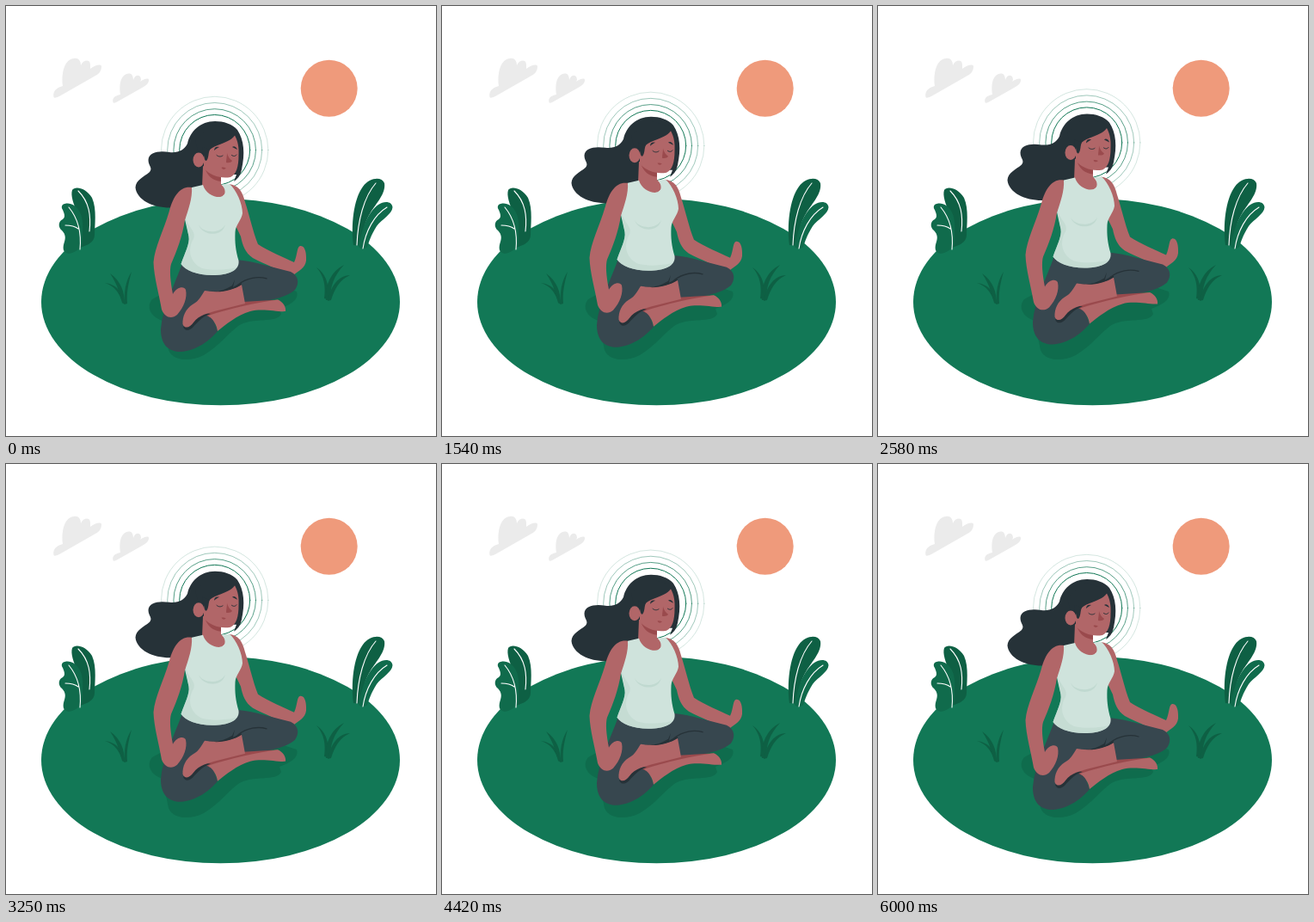
Recreate the animation shown at these times as an HTML page. Size 500 by 500 pixels, loop 6040 ms.

```html
<!DOCTYPE html>
<html lang="en">
<head>
<meta charset="utf-8">
<title>Meditation</title>
<style>
  html, body { margin: 0; width: 100%; height: 100%; overflow: hidden; background: #fff; }
  svg { display: block; width: 100vw; height: 100vh; }
  .line { fill: none; stroke-linecap: round; stroke-linejoin: round; }
  .leaf { fill: #0e6044; }
  .leaf-light { fill: #106b4c; }
  .vein { stroke: #fff; stroke-width: 1.1; }
  .shade { fill: #0f6c4d; }
  .skin { fill: #b16668; }
  .skin-dark { fill: #9a4a4d; }
  .hair { fill: #263238; }
  .pants { fill: #37474f; }
  .fold { stroke: #263238; stroke-width: 1.3; }
  .top { fill: #cfe3dc; }
  .top-dark { fill: #c0d9d0; }
</style>
</head>
<body>
<svg viewBox="0 0 500 500">
  <!-- sky -->
  <circle cx="375.7" cy="95.8" r="33" fill="#ef9a7b"/>
  <g fill="#ebebeb">
    <path d="M55.5 106C54 100 58 95 66 93C64 78 68 62 79 61C85 60 87 65 87 69C90 62 98 62 98 68V73C103 69 110 67 111 70C111 76 108 79 104 81L62 105C58 107 56 107 55.5 106Z"/>
    <path d="M124.5 112C123 107 127 104 133 103C131 90 134 79 143 78.5C147 78 148 83 148 86C150 79 157 79 157 86L156 88C160 85 166 83 166 86C166 90 163 92 160 94L129 111.5C126 113 125 113 124.5 112Z"/>
  </g>

  <ellipse cx="249.5" cy="344.1" rx="208.5" ry="120.2" fill="#127856"/>

  <!-- plants -->
  <path class="leaf" d="M77 214C80 209 93 211 100 223C106 236 103 256 103 267C102 276 94 278 86 281L84 242C78 230 75 220 77 214Z"/>
  <path class="line vein" d="M84 215C97 228 99 244 97 262"/>
  <path class="leaf-light" d="M66 231C72 227 82 231 86 240C91 250 89 262 88 279C84 284 79 287 73 288C65 287 66 280 68 274C70 268 68 264 65 261C60 257 61 250 66 248C70 245 67 240 66 237C64 234 65 232 66 231Z"/>
  <path class="line vein" d="M73 234C83 246 88 262 86 283M69 255C75 255 80 256 84 259"/>
  <path class="leaf" d="M404 278C401 255 404 225 415 210C423 199 437 198 440 206C442 218 430 230 424 240C417 251 414 265 413 279Z"/>
  <path class="line vein" d="M430 206C416 222 409 250 408 278"/>
  <path class="leaf-light" d="M410 280C413 262 420 240 433 231C440 226 449 227 449.5 234C449 242 437 248 431 256C424 267 422 275 420 280C417 283 413 283 410 280Z"/>
  <path class="line vein" d="M443 234C428 243 418 262 415 282"/>
  <g class="leaf">
    <path d="M136 346C136 334 130 324 115 322C128 326 132 335 136 346Z"/>
    <path d="M138 347C138 333 134 320 121 311C130 324 132 335 135 345Z"/>
    <path d="M138 347C137 332 139 320 146 309C142 323 140 334 141 346Z"/>
    <path d="M370 340C372 326 370 314 361 304C374 313 376 327 374 341Z"/>
    <path d="M372 342C371 323 378 309 393 301C381 314 377 326 377 342Z"/>
    <path d="M374 343C378 325 386 314 400 313C388 318 382 329 378 342Z"/>
  </g>
  <path class="shade" d="M170 341C163 349 167 361 182 366L189 400C194 413 214 414 230 406C248 395 257 382 270 372C286 361 315 370 320 358L318 352C332 347 341 341 338 332L270 310L190 330Z"/>

  <g id="woman">
    <g id="rings" class="line" stroke="#117755" stroke-width="1"></g>

    <path class="hair" d="M243 134C226 134 214 146 211 160C207 168 200 171 190 170C178 168 166 170 165.500 179C165.500 186 171 188 167 193C160 199 151 202 150.500 211C152 226 172 235 192 234.500C208 232 216 218 230 209L250 196L268 196L265 204C271 200 273 195 274 190C278 172 277 156 269 144C263 137 253 134 243 134Z"/>

    <!-- far arm and neck -->
    <path class="skin" d="M259 207C270 208 275 215 278 228C283 243 287 262 293 277C305 285 322 292 335 298C339 290 338 280 342 279C348 278 349.500 288 349 296C348 305 340 308 334 313C322 309 300 300 287 293C278 287 275 278 273 268L262 245Z"/>
    <path class="skin" d="M229 186L228 211C232 226 256 226 256 214L250 207V196Z"/>

    <!-- legs -->
    <path class="pants" d="M205 299C196 325 182 350 180 376C180 395 190 402 203 402C222 401 238 388 246 378L237 354L278 346C300 344 325 340 336 330C341 323 341 314 331 309C310 304 290 297 268 295Z"/>
    <path class="skin-dark" d="M230 358L276 344L317 341.500L280 352L237 362Z"/>
    <path class="skin" d="M235 360C260 352 290 345 316 341.500C322 344 326 350 325 355C316 356 298 351 284 355C268 360 256 370 246 378C245 371 241 364 235 360Z"/>
    <path class="hair" d="M206 373C208 378 212 378 217 374C224 366 230 360 238 358L226 356Z"/>
    <path class="skin" d="M274 324C260 332 245 333 231 331C228 335 225 343 217 347C209 352 205 361 205.500 370C208 376 214 374 218 368C224 359 236 357 246 354L278 346Z"/>
    <path class="hair" d="M227 328C238 334 250 333 263 325L266 318L264 327C270 323 275 321 274 324C262 332 240 336 227 328Z"/>
    <path class="line fold" d="M270 324C280 316 293 314 303 317"/>

    <!-- tank top -->
    <path class="top" d="M216 211L229 208C232 218 242 223 250 222C257 220 255 212 251 207.500L260 207C268 214 275 230 275 241C274 249 267 254 266.500 263C266 275 267 284 270.500 296C272 308 258 313 240 313C222 313 208 307 203.500 300C208 287 214 276 212.500 268L208 248Z"/>
    <path class="top-dark" d="M208.500 246C212 257 222 263 218 271C211 282 213 298 228 305C240 308 256 307 268 304C262 312 250 313 240 313C222 313 208 307 203.500 300C208 287 214 276 212.500 268Z" opacity=".65"/>
    <path class="top-dark" d="M224 254C228 264 249 266 255 254C252 269 228 268 224 254Z"/>

    <!-- near arm -->
    <path class="skin" d="M216 211C203 209 195 220 190 238C183 262 173 280 171.500 298C172 315 178 335 181 353C185 363 193 364 199 359C207 350 211 339 209 330C207 325 198 327 194 335C191 319 190 307 192 300C199 284 205 268 208 249C212 237 217 223 216 211Z"/>

    <!-- head -->
    <path class="skin-dark" d="M231 188C238 194 245 198 250 198V204C241 203 234 198 231 188Z"/>
    <path class="skin" d="M230 165L250 150L266 150.500C270 158 271 165 270.500 174C270.500 186 268 196 261 199C249 201 238 197 230 189Z"/>
    <path class="hair" d="M224 172L235 170C237 166 241 164 246 162C255 158.500 262 156 266 150.500L268 146L240 138L220 156Z"/>
    <path class="hair" d="M228 164L237 167C235 171 236 177 233 180C230 180 231 174 229 171Z"/>
    <ellipse class="skin" cx="224" cy="179" rx="6.500" ry="8.500"/>
    <path class="skin-dark" d="M257 171C257 175 256 178 256 182C259 182.500 262 182 263 180C260 178 258 175 257 171Z"/>
    <path class="hair" d="M242 168C242 164 245 163 248 164C246 165 244 166 242 168ZM263 164C265 162 268 164 269 167C267 166 265 165 263 164Z"/>
    <path class="line" stroke="#263238" stroke-width="1" d="M245 173.500C247 175.500 250 175.500 252 174M262.500 173.500C264.500 175 266.500 175 268 173"/>
    <path class="skin-dark" d="M250.500 188C252 187 254 188 256 188.500C254 190.500 252 190.500 250.500 188Z"/>
  </g>
</svg>
<script>
  const LOOP = 6040, HALF = 3000, RISE = 10;
  const woman = document.getElementById("woman");
  const rings = document.getElementById("rings");

  [[41, 1], [47.8, 0.7], [55, 0.4], [62.2, 0.18]].forEach(([radius, opacity]) => {
    const ring = document.createElementNS("http://www.w3.org/2000/svg", "circle");
    const attributes = { cx: 242.7, cy: 167.5, r: radius, "stroke-opacity": opacity };
    for (const name in attributes) ring.setAttribute(name, attributes[name]);
    rings.append(ring);
  });

  // Floats up and back down at constant speed.
  function draw(time) {
    const height = RISE * Math.max(0, 1 - Math.abs(time / HALF - 1));
    woman.setAttribute("transform", `translate(0 ${-height})`);
  }

  const start = performance.now();
  function tick() {
    draw((performance.now() - start) % LOOP);
    requestAnimationFrame(tick);
  }
  tick();
</script>
</body>
</html>
```
